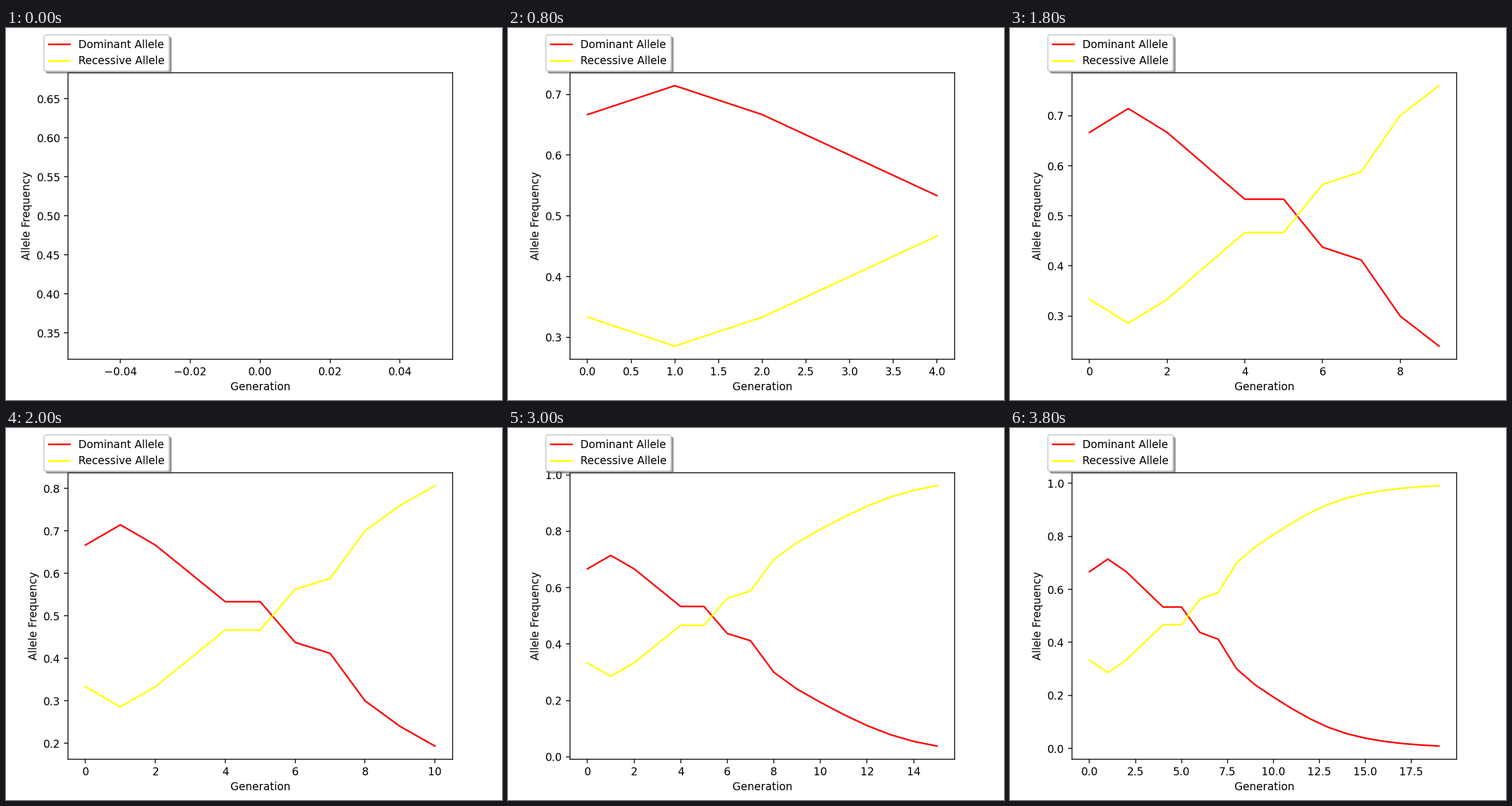
Recreate the animation shown at these times as a matplotlib script. Size 864 px wide and 648 px high, loop 4 s.

```python
import matplotlib.pyplot as plt
import numpy as np
from matplotlib.animation import FuncAnimation

GENERATIONS = 20
INTERVAL = 200

# Recessive alleles: an irregular start, then each generation adds
# the offspring of the one three steps earlier.
recessive = [2, 2, 3, 4, 7, 7, 9, 10, 14, 19, 25, 34, 48, 70, 103, 150]
while len(recessive) < GENERATIONS:
    recessive.append(recessive[-1] + recessive[-3])
recessive = np.array(recessive)

dominant = np.full(GENERATIONS, 6)
dominant[:8] = [4, 5, 6, 6, 8, 8, 7, 7]

generation = np.arange(GENERATIONS)
dominant_freq = dominant / (dominant + recessive)
recessive_freq = 1 - dominant_freq

fig, ax = plt.subplots(figsize=(6.4, 4.8), dpi=135)
dominant_line, = ax.plot([], [], color="red", label="Dominant Allele")
recessive_line, = ax.plot([], [], color="yellow", label="Recessive Allele")
ax.set_xlabel("Generation")
ax.set_ylabel("Allele Frequency")
ax.legend(loc="upper center", bbox_to_anchor=(0.1, 1.15),
          fancybox=True, shadow=True)


def update(i):
    shown = slice(0, i + 1)
    dominant_line.set_data(generation[shown], dominant_freq[shown])
    recessive_line.set_data(generation[shown], recessive_freq[shown])
    ax.relim()
    ax.autoscale_view()
    return dominant_line, recessive_line


anim = FuncAnimation(fig, update, frames=GENERATIONS, interval=INTERVAL,
                     repeat=True, repeat_delay=0, blit=False)
plt.show()
```
